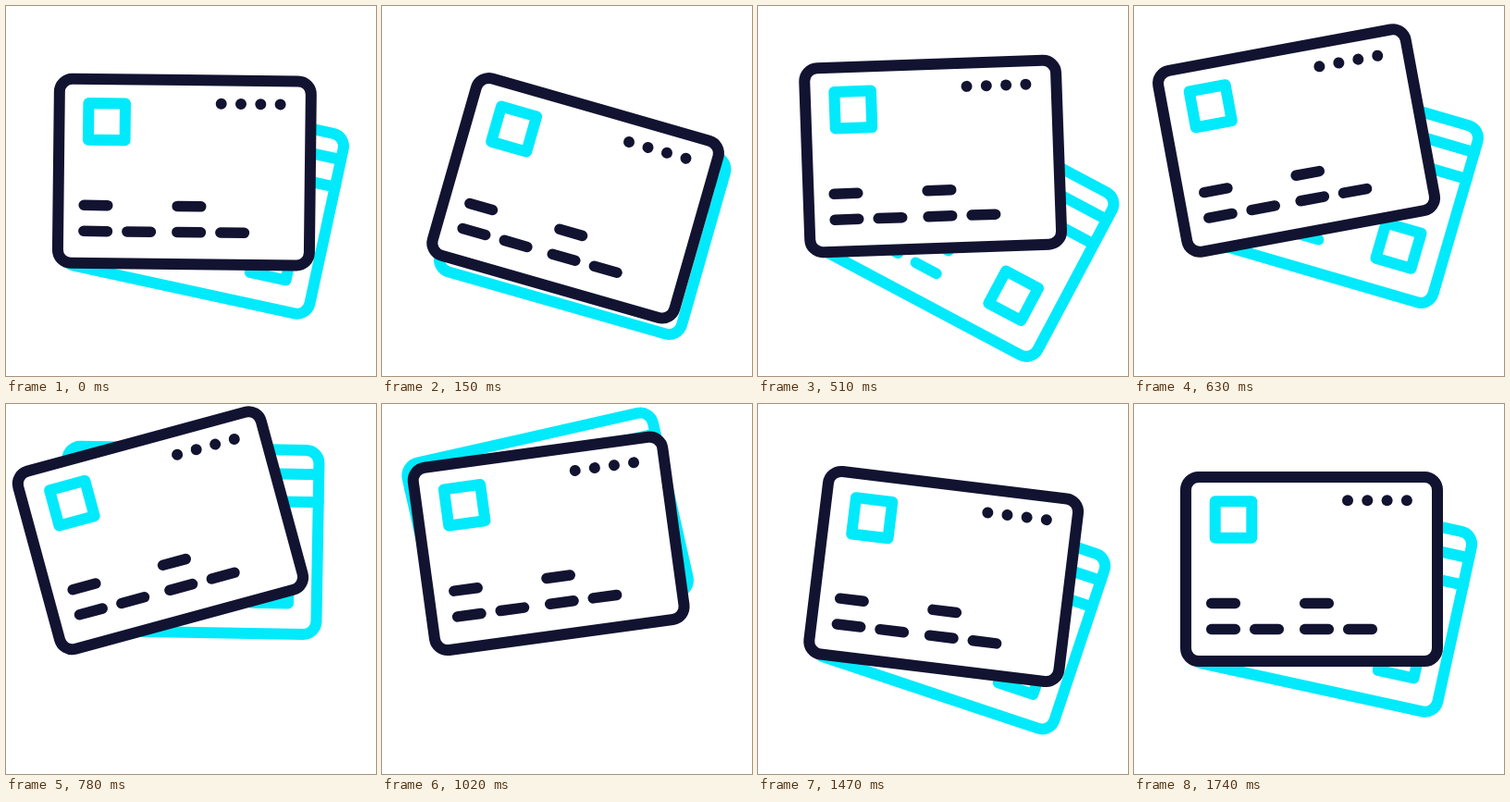
An HTML page with a canvas that plays this animation: 400x400 px, repeating every 1.77 s.

```html
<!DOCTYPE html>
<html lang="en">
<head>
<meta charset="utf-8">
<title>Payment cards</title>
<style>
  html, body { margin: 0; width: 100%; height: 100%; overflow: hidden; background: #fff; }
  canvas { display: block; }
</style>
</head>
<body>
<canvas id="stage" width="400" height="400"></canvas>
<script>
const ctx = document.getElementById('stage').getContext('2d');
const LOOP = 1770, STEP = 30;
const INK = '#121331', CYAN = '#00eafc';
const LINE = 12;

// Card outline (centre line), measured from the card's middle
const HALF_W = 136, HALF_H = 99.5, RADIUS = 14;
// Each card swings about a point near its lower left corner
const HINGE_X = -122, HINGE_Y = 79.3;

// [time, value] keys: swing in degrees, hinge height in pixels
const front = {
  x: 70,
  swing: [[-30, 0], [315, 30], [510, -2], [540, -5.2], [780, -15.2],
          [1230, 1.5], [1455, 7], [1620, 2.8], [1740, 0]],
  lift: [[-30, 257.8], [300, 244.8], [510, 246], [780, 245.2],
         [1230, 247.3], [1470, 250.5], [1620, 256.5], [1740, 257.8]]
};
const back = {
  x: 77.6,
  swing: [[-30, 12.1], [330, 22.7], [480, 28.4], [510, 28], [540, 25.7],
          [780, 1], [1050, -13], [1085, -13], [1230, -5.4],
          [1485, 18.6], [1620, 15.2], [1770, 12.1]],
  lift: [[-30, 260.6], [320, 275], [510, 244.8], [540, 241], [780, 224.5],
         [1080, 242], [1230, 249.5], [1470, 254.4], [1620, 258], [1740, 260.6]]
};

// Smooth curve through the keys that never overshoots them
function curve(keys, t) {
  const last = keys.length - 1;
  if (t <= keys[0][0]) return keys[0][1];
  if (t >= keys[last][0]) return keys[last][1];
  const rise = i => (keys[i + 1][1] - keys[i][1]) / (keys[i + 1][0] - keys[i][0]);
  const slope = i => {
    if (i === 0 || i === last) return 0;
    const a = rise(i - 1), b = rise(i);
    return a * b <= 0 ? 0 : 2 * a * b / (a + b);
  };
  let i = 0;
  while (t > keys[i + 1][0]) i++;
  const [t0, v0] = keys[i], [t1, v1] = keys[i + 1];
  const d = t1 - t0, u = (t - t0) / d, u2 = u * u, u3 = u2 * u;
  return v0 + (v1 - v0) * (3 * u2 - 2 * u3)
    + d * (slope(i) * (u3 - 2 * u2 + u) + slope(i + 1) * (u3 - u2));
}

function place(card, t) {
  ctx.translate(card.x, curve(card.lift, t));
  ctx.rotate(curve(card.swing, t) * Math.PI / 180);
  ctx.translate(-HINGE_X, -HINGE_Y);
}

function line(x0, x1, y, width = LINE) {
  ctx.lineWidth = width;
  ctx.beginPath();
  ctx.moveTo(x0, y);
  ctx.lineTo(x1, y);
  ctx.stroke();
}

function dash(x, y) {
  line(x - 12.8, x + 12.8, y, 11.5);
}

function chip(x, y) {
  ctx.lineWidth = LINE;
  ctx.strokeStyle = CYAN;
  ctx.strokeRect(x - 19.8, y - 19.8, 39.6, 39.6);
}

function outline(color) {
  const w = HALF_W, h = HALF_H;
  ctx.beginPath();
  ctx.moveTo(0, -h);
  ctx.arcTo(w, -h, w, h, RADIUS);
  ctx.arcTo(w, h, -w, h, RADIUS);
  ctx.arcTo(-w, h, -w, -h, RADIUS);
  ctx.arcTo(-w, -h, w, -h, RADIUS);
  ctx.closePath();
  ctx.fillStyle = '#fff';
  ctx.fill();
  ctx.lineWidth = LINE;
  ctx.strokeStyle = color;
  ctx.stroke();
}

function drawBack(t) {
  ctx.save();
  place(back, t);
  outline(CYAN);
  line(-HALF_W, HALF_W, -73.5);
  line(-HALF_W, HALF_W, -43.5);
  chip(85.5, 46.5);
  dash(-12, 36.5);
  dash(-59, 64.5);
  dash(-12, 64.5);
  ctx.restore();
}

function drawFront(t) {
  ctx.save();
  place(front, t);
  outline(INK);
  for (const x of [-95.5, 5.5]) {
    dash(x, 37);
    dash(x, 65);
    dash(x + 47, 65);
  }
  ctx.fillStyle = INK;
  for (let i = 0; i < 4; i++) {
    ctx.beginPath();
    ctx.arc(39 + i * 21.3, -74.3, 6, 0, Math.PI * 2);
    ctx.fill();
  }
  chip(-84.5, -53.5);
  ctx.restore();
}

function draw() {
  const t = Math.floor(performance.now() % LOOP / STEP) * STEP;
  ctx.fillStyle = '#fff';
  ctx.fillRect(0, 0, 400, 400);
  ctx.lineCap = ctx.lineJoin = 'round';
  drawBack(t);
  drawFront(t);
  requestAnimationFrame(draw);
}
draw();
</script>
</body>
</html>
```
